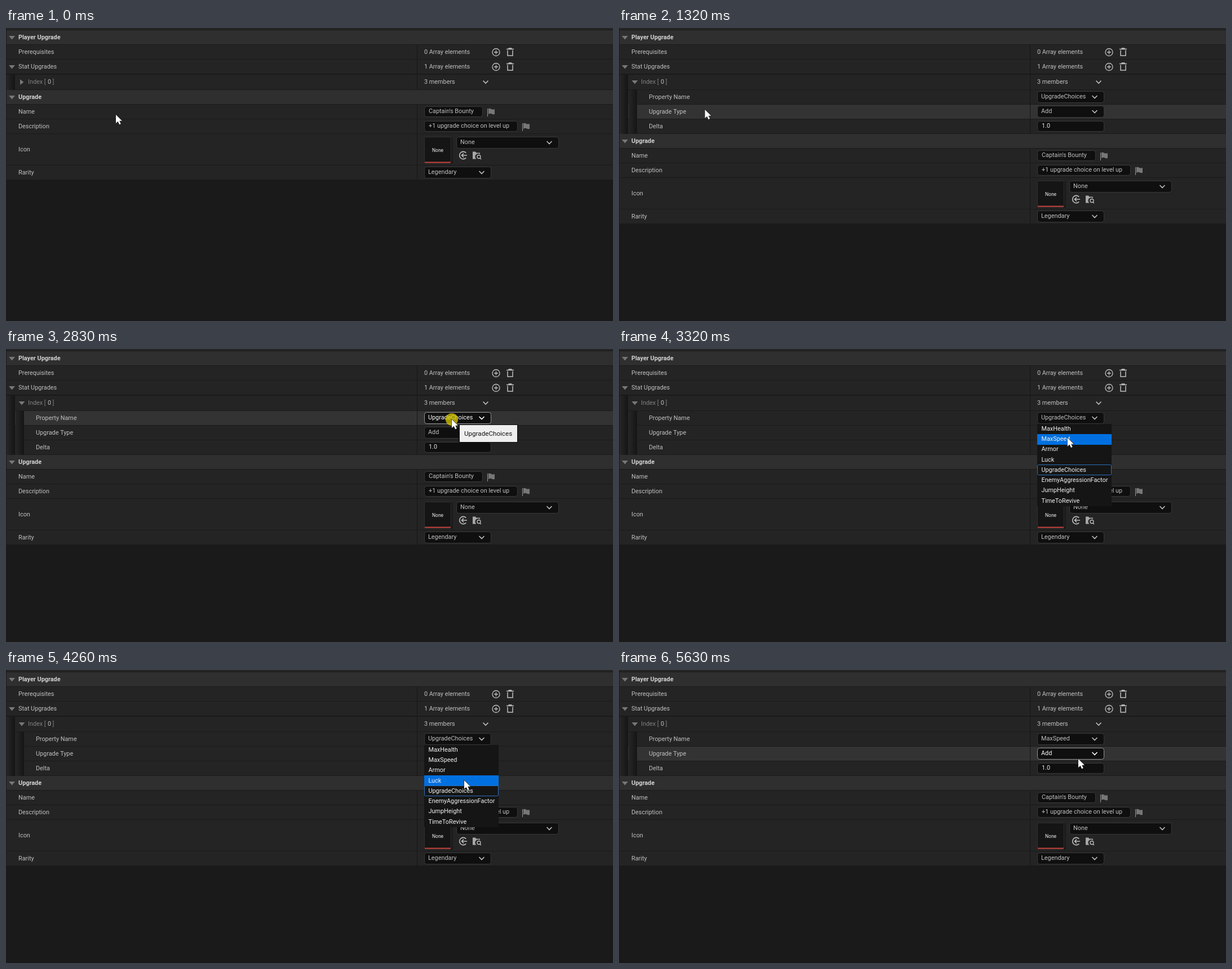
Recreate the animation shown at these times as an HTML page with a canvas. Size 1077 px wide and 520 px high, loop 5.69 s.

```html
<!DOCTYPE html>
<html lang="en">
<head>
<meta charset="utf-8">
<title>Upgrade details panel</title>
<style>
html, body { margin: 0; height: 100%; overflow: hidden; background: #1a1a1a; }
canvas { display: block; }
</style>
</head>
<body>
<canvas id="stage" width="1077" height="520"></canvas>
<script>
const c = document.getElementById('stage').getContext('2d');
const LOOP = 5690, EXPAND = 1000, OPEN = 2895, CLOSE = 5625;
const GREY = '#c0c0c0', DIM = '#777', WHITE = '#fff', PAGE = '#1a1a1a';
const FIELD = '#0f0f0f', WELL = '#151515', EDGE = '#383838';
const VALUE_X = 742;
const OPTIONS = ['MaxHealth', 'MaxSpeed', 'Armor', 'Luck', 'UpgradeChoices',
  'EnemyAggressionFactor', 'JumpHeight', 'TimeToRevive'];
const LIST_TOP = 132.75, LIST_STEP = 18.25;

// Pointer stops: time, x, y and, for a fast sweep, how far it sags
const STOPS = [
  [0, 195, 154], [480, 7, 62], [760, 23, 87], [1250, 19, 90],
  [2420, 799, 126, 100], [2620, 799, 126], [2760, 791, 125], [3100, 791, 125],
  [3790, 811, 260], [4000, 812, 261], [4260, 813, 196], [4730, 814, 133.5],
  [4800, 821, 121], [5000, 821, 121], [5280, 819, 204], [5630, 815, 158], [LOOP, 815, 158]
];

function pointerAt(t) {
  const i = STOPS.findIndex(stop => stop[0] > t);
  const [t0, x0, y0] = STOPS[i - 1], [t1, x1, y1, sag = 0] = STOPS[i];
  const k = (t - t0) / (t1 - t0);
  const e = sag ? 1 - (1 - k) ** 3 : k * k * (3 - 2 * k);
  return {
    x: x0 + (x1 - x0) * e,
    y: y0 + (y1 - y0) * e + sag * Math.sin(Math.PI * Math.sqrt(k)) ** 2
  };
}

const between = (v, a, b) => v >= a && v < b;

function rect(x, y, w, h, color) {
  c.fillStyle = color;
  c.fillRect(x, y, w, h);
}

function text(s, x, mid, color = GREY, size = 10.85, weight = 400) {
  c.font = `${weight} ${size}px Roboto, sans-serif`;
  c.fillStyle = color;
  c.fillText(s, x, Math.floor(mid + size * .34));
}

function shape(d, x, y, color, width) {
  const path = new Path2D(d);
  c.save();
  c.translate(x, y);
  c.fillStyle = c.strokeStyle = color;
  c.lineWidth = width;
  if (width) c.stroke(path);
  else c.fill(path);
  c.restore();
}

function box(x, y, w, h, edge = EDGE, fill = FIELD, radius = 4) {
  c.beginPath();
  c.roundRect(x + .5, y + .5, w - 1, h - 1, radius);
  c.fillStyle = fill;
  c.fill();
  c.strokeStyle = edge;
  c.lineWidth = 1;
  c.stroke();
}

function fade(x, y, w, h, from, to) {
  const gradient = c.createLinearGradient(x, 0, x + w, 0);
  gradient.addColorStop(0, from);
  gradient.addColorStop(1, to);
  rect(x, y, w, h, gradient);
}

const chevron = (x, y, color = GREY) => shape('M-4.5-2L0 2.5L4.5-2', x, y, color, 1.6);
const arrowDown = (x, y, color = DIM) => shape('M-5.5-3H5.5L0 3.5Z', x, y, color);
const arrowRight = (x, y) => shape('M-3-5L3.5 0L-3 5Z', x, y, DIM);

function combo(label, y, hot = false, x = VALUE_X, w = 119) {
  const color = hot ? WHITE : GREY;
  box(x, y - 10, w, 21, hot ? '#949494' : EDGE);
  text(label, x + 7, y, color);
  chevron(x + w - 17, y, color);
}

function textField(s, y, w, color) {
  box(VALUE_X, y - 9, w, 19);
  text(s, VALUE_X + 8, y - .5, color);
}

function localizedField(s, y, w) {
  const x = VALUE_X + w + 8;
  textField(s, y, w);
  shape('M.5-5V9', x, y, '#999', 1);
  shape('M2-5Q5-6 7-4Q10-3 13-4V5Q10 6 7 4Q5 3 2 5Z', x, y, DIM);
}

function arrayValue(count, y) {
  text(`${count} Array elements`, VALUE_X, y);
  shape('M6.5 0A6.5 6.5 0 1 1-6.5 0A6.5 6.5 0 1 1 6.5 0M-3.5 0H3.5M0-3.5V3.5', 869.5, y + .5, GREY, 1.3);
  shape('M-6.5-5H6.5M-3-6.5H3M-4.5-3V6.5H4.5V-3', 894.5, y, GREY, 1.5);
}

function row(label, top, { height = 25, x = 22, indent = 0, hot = false } = {}) {
  rect(1, top, 1076, height, hot ? '#333' : '#242424');
  rect(1, top + height, 1076, 1, PAGE);
  rect(729, top, 1, height + 1, '#171717');
  for (let i = 0; i < indent; i++) fade(1 + i * 16, top, 15, height + 1, '#262626', '#151515');
  text(label, x, top + height / 2);
}

function header(label, top) {
  rect(1, top, 1076, 25, '#2f2f2f');
  rect(1, top + 25, 1076, 1, PAGE);
  text(label, 22, top + 12.5, '#d2d2d2', 10.85, 700);
  arrowDown(10.5, top + 13);
}

function iconValue() {
  fade(789, 194, 5, 47, '#111', '#242424');
  box(VALUE_X, 193, 48, 47, '#303030', WELL, 2);
  rect(743, 237.5, 46, 2, '#c4403c');
  text('None', 756, 217.5, '#f0f0f0', 8.5);
  combo('None', 203, false, 799, 182);
  shape('M5.2-4.4A6.6 6.6 0 1 0 5.2 4.4M7 0H-2.5M1-3.5L-2.5 0L1 3.5', 811, 226, GREY, 1.6);
  shape('M-7.5-6.5H-2.5L-1-4.5H5.5V-2A5 5 0 0 0-1 6.5H-7.5Z', 835.5, 226, '#a8a8a8');
  shape('M6.5 2.5A3 3 0 1 1 .5 2.5A3 3 0 1 1 6.5 2.5M5.5 5L7.5 7', 835.5, 226, GREY, 1.3);
}

function upgradeSection() {
  header('Upgrade', 110);
  row('Name', 136);
  localizedField("Captain's Bounty", 148, 104);
  row('Description', 162);
  localizedField('+1 upgrade choice on level up', 174, 166);
  row('Icon', 188, { height: 55 });
  iconValue();
  row('Rarity', 244);
  combo('Legendary', 256);
}

function optionList(p) {
  rect(VALUE_X, 133, 132, 146, WELL);
  const hovered = Math.floor((p.y - LIST_TOP) / LIST_STEP);
  OPTIONS.forEach((name, i) => {
    const y = LIST_TOP + i * LIST_STEP, top = Math.floor(y);
    if (i === hovered) rect(VALUE_X, top, 132, 19, '#0070e0');
    else if (name === 'UpgradeChoices') box(VALUE_X, top, 132, 19, '#2b70bd', WELL, 2);
    text(name, VALUE_X + 7.5, y + 9, '#f2f2f2');
  });
}

function tooltip(p) {
  const x = Math.round(p.x + 13), y = Math.round(p.y + 9);
  rect(x - 1, y, 105, 32, '#111');
  rect(x + 1, y + 1, 102, 30, '#efefef');
  text('UpgradeChoices', x + 9, y + 16.5, '#111', 11.65);
}

function pointer(p, pressed) {
  if (pressed) {
    c.beginPath();
    c.arc(p.x, p.y, 11, 0, 7);
    c.fillStyle = 'rgba(214,200,0,.76)';
    c.fill();
  }
  const outline = 'M0 0V15L3.6 11.8L6.2 17.2L8.7 16L6.2 10.8H10.8Z';
  shape(outline, p.x, p.y, '#222', 1.2);
  shape(outline, p.x, p.y, WHITE);
}

function draw(t) {
  const p = pointerAt(t);
  const expanded = t >= EXPAND, listOpen = between(t, OPEN, CLOSE);
  const overStats = between(t, 400, 820);
  const hotRow = top => t > 820 && between(p.y, top, top + 26) && !(listOpen && p.y >= LIST_TOP);
  const hotField = top => hotRow(top) && between(p.x, VALUE_X, 861);

  rect(0, 0, 1077, 520, PAGE);
  rect(1, 0, 1076, 3, '#242424');
  header('Player Upgrade', 4);
  row('Prerequisites', 30);
  arrayValue(0, 42.5);
  row('Stat Upgrades', 56, { hot: overStats });
  arrowDown(10.5, 69, overStats ? WHITE : DIM);
  arrayValue(1, 68.5);

  row('', 83, { height: 26, indent: 1, hot: hotRow(83) });
  text('Index [', 39, 95.5, '#808080');
  text('0', 74, 95.5);
  text(']', 82.5, 95.5, '#808080');
  (expanded ? arrowDown : arrowRight)(28, 96);
  text('3 members', VALUE_X, 95.5);
  chevron(851, 95.5);

  c.save();
  if (expanded) {
    ['Property Name', 'Upgrade Type', 'Delta'].forEach((label, i) => {
      const top = 110 + i * 26;
      row(label, top, { x: 53, indent: 2, hot: hotRow(top) });
    });
    combo(t < CLOSE ? 'UpgradeChoices' : 'MaxSpeed', 122, hotField(110));
    combo('Add', 148, hotField(136));
    textField('1.0', 174, 119, '#e4e4e4');
    c.translate(0, 78);
  }
  upgradeSection();
  c.restore();

  if (listOpen) optionList(p);
  if (between(t, 2620, 3100) || between(t, 5000, 5070)) tooltip(p);
  pointer(p, [EXPAND, OPEN, CLOSE].some(click => between(t, click - 130, click)));
}

function tick() {
  draw(performance.now() % LOOP);
  requestAnimationFrame(tick);
}
tick();
</script>
</body>
</html>
```
